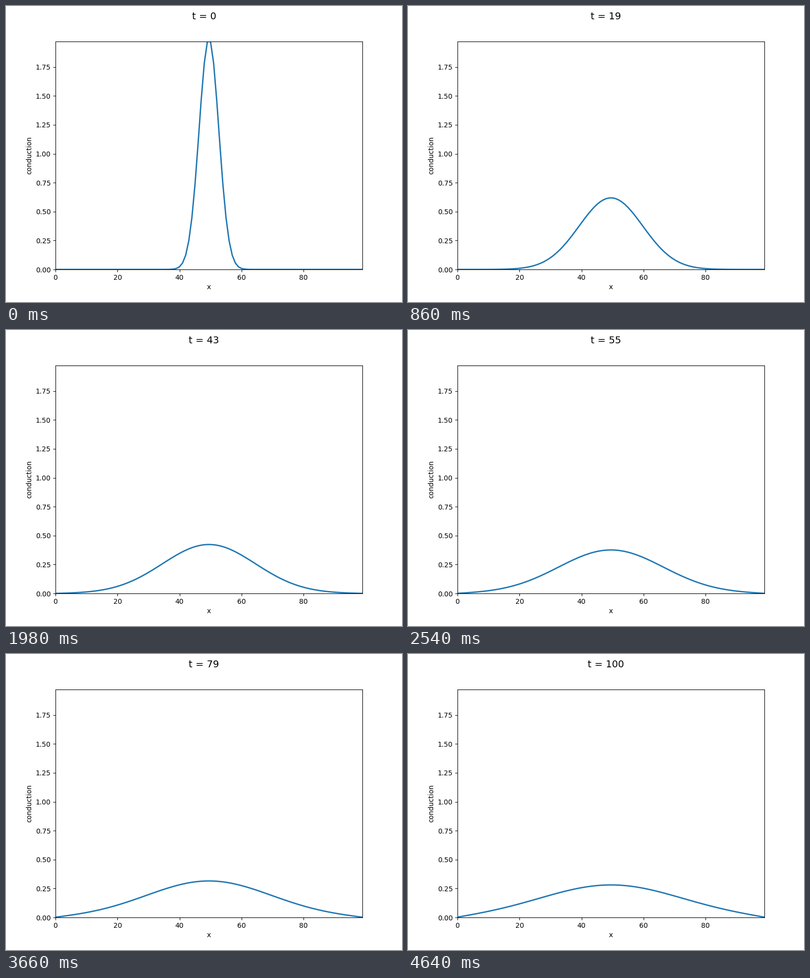
A matplotlib script for the animation above (4.66 s loop, 800 px wide and 600 px high).

```python
import numpy as np
import matplotlib.pyplot as plt
from matplotlib.animation import FuncAnimation

CELLS = 100
STEPS = 100
SUBSTEPS = 10
RATE = 0.25          # diffusion number of one substep
SIGMA = 0.2
TICK_MS = 20
TICKS = 233


def initial_state():
    """Normal density sampled at the cell centres of [0, 2 pi]."""
    dx = 2 * np.pi / CELLS
    x = (np.arange(CELLS) + 0.5) * dx
    return np.exp(-((x - np.pi) / SIGMA) ** 2 / 2) / (SIGMA * np.sqrt(2 * np.pi))


def diffuse(u):
    """Advance one step with both end faces held at zero."""
    for _ in range(SUBSTEPS):
        p = np.concatenate(([-u[0]], u, [-u[-1]]))
        u = u + RATE * (p[2:] - 2 * u + p[:-2])
    return u


def step_at(tick):
    """Every third step holds for five ticks, the others for one."""
    if tick == 0:
        return 0
    group, part = divmod(tick - 1, 7)
    return 1 + 3 * group + max(0, part - 4)


states = [initial_state()]
for _ in range(STEPS):
    states.append(diffuse(states[-1]))

fig, ax = plt.subplots(figsize=(8, 6), dpi=100)
title = fig.suptitle("t = 0", fontsize=14)
line, = ax.plot(np.arange(CELLS), states[0], color="#1f77b4", linewidth=2)
ax.set_xlim(0, CELLS - 1)
ax.set_ylim(0, states[0].max())
ax.set_xlabel("x")
ax.set_ylabel("conduction")


def draw(tick):
    step = step_at(tick)
    line.set_ydata(states[step])
    title.set_text(f"t = {step}")
    return line, title


anim = FuncAnimation(fig, draw, frames=TICKS, interval=TICK_MS,
                     repeat=True, repeat_delay=0, blit=False)
plt.show()
```
